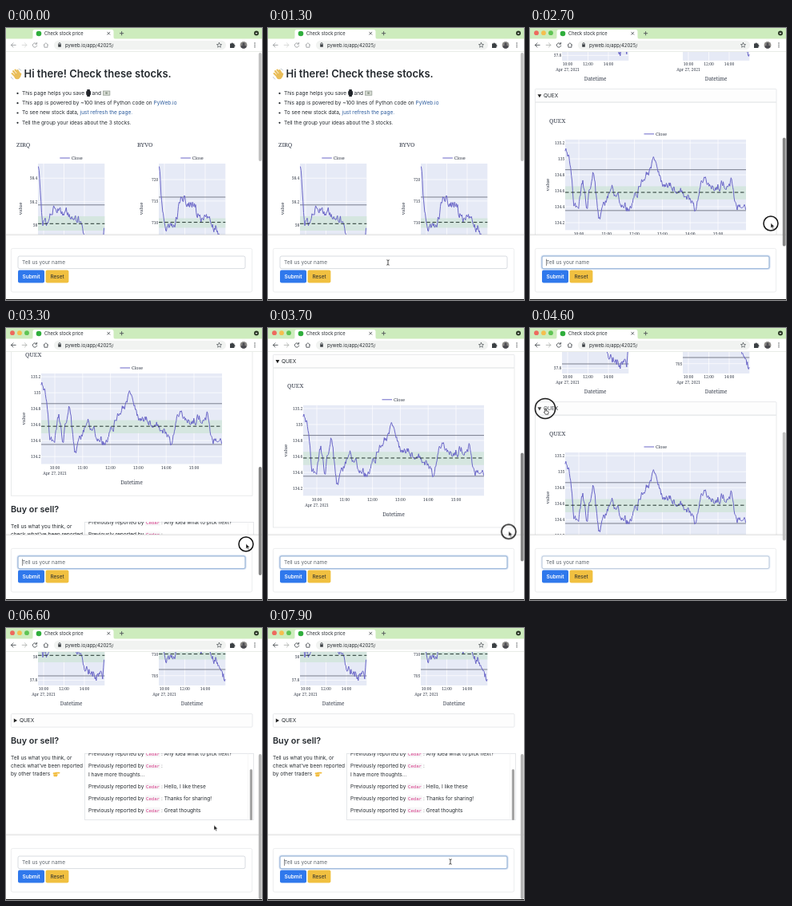
An HTML page that plays this animation: 320 by 341 pixels, repeating every 8000 ms.

```html
<!DOCTYPE html>
<html lang="en">
<head>
<meta charset="utf-8">
<title>Check stock price</title>
<style>
@property --scroll { syntax: "<number>"; inherits: true; initial-value: 0; }
@property --list { syntax: "<number>"; inherits: true; initial-value: 26; }
@property --open { syntax: "<number>"; inherits: true; initial-value: 1; }

html, body { margin: 0; width: 100%; height: 100%; overflow: hidden; background: #fff; }
#stage {
  display: block; width: 100vw; height: 100vh;
  animation: scroll 8s linear infinite, list 8s linear infinite, fold 8s step-end infinite;
}
text { font-family: Inter, "Open Sans", sans-serif; fill: #24292e; white-space: pre; }
.serif { font-family: "Noto Serif", "Liberation Serif", serif; fill: #333a48; }
.code { font-family: "Liberation Mono", "DejaVu Sans Mono", monospace; fill: #d63384; font-size: 5.7px; }
.link { fill: #2a5a9c; }
.line { fill: none; stroke-linecap: round; stroke-linejoin: round; }

#page { transform: translateY(calc(var(--scroll) * -1px)); }
#below { transform: translateY(calc(var(--open) * 200px)); }
#messages { transform: translateY(calc(var(--list) * -1px)); }
#listThumb { transform: translateY(calc(var(--list) * .77px)); animation: listGrab 8s step-end infinite; }
#thumb { transform: translateY(calc(var(--scroll) * .44px)); animation: grab 8s step-end infinite; }
.opened { opacity: var(--open); }
.closed { opacity: calc(1 - var(--open)); }

#lights { animation: wake 8s step-end infinite; }
#nav { animation: wakeNav 8s step-end infinite; }
#glow { animation: glow 8s linear infinite; }
#focus { animation: focus 8s step-end infinite; }
#caret { animation: blink calc(8s / 13) step-end infinite; }
#mouse { animation: mouse 8s linear infinite; }
#ring { animation: press 8s step-end infinite, shrink 8s linear infinite; }
#arrow { animation: arrow 8s step-end infinite; }
#hand { animation: hand 8s step-end infinite; }
#beam { animation: beam 8s step-end infinite; }

@keyframes scroll {
  0%, 23.5% { --scroll: 0; }
  26.25% { --scroll: 23.5; }
  33.75% { --scroll: 242; }
  41.25%, 43.75% { --scroll: 325; }
  50%, 58.2% { --scroll: 226; }
  58.21%, 100% { --scroll: 211; }
}
@keyframes list {
  0%, 67.5% { --list: 26; }
  71.25% { --list: 9; }
  73.75% { --list: 0; }
  78.1%, 100% { --list: 26; }
}
@keyframes fold { 0% { --open: 1; } 58.2%, 100% { --open: 0; } }
@keyframes grab { 0%, 50.3%, 100% { fill: #c2c2c2; } 23.5% { fill: #858585; } }
@keyframes listGrab { 0%, 79%, 100% { fill: #a5a5a5; } 66.8% { fill: #808080; } }
@keyframes wake { 0% { opacity: 0; } 16.8%, 100% { opacity: 1; } }
@keyframes wakeNav { 0% { opacity: .55; } 16.8%, 100% { opacity: 1; } }
@keyframes glow {
  0%, 16.8% { opacity: 0; }
  18.75%, 56.3% { opacity: 1; }
  58.5%, 90% { opacity: 0; }
  92%, 100% { opacity: 1; }
}
@keyframes focus { 0%, 56.3% { opacity: 0; } 16.8%, 90%, 100% { opacity: 1; } }
@keyframes blink { 0%, 86% { opacity: 0; } 34% { opacity: 1; } }
@keyframes mouse {
  0%, 4% { transform: translate(150px, 355px); animation-timing-function: ease-in-out; }
  13.75%, 18% { transform: translate(150px, 294px); animation-timing-function: ease-in-out; }
  23.5% { transform: translate(317px, 137px); }
  26.25% { transform: translate(317px, 144px); }
  33.75% { transform: translate(301px, 245px); }
  41.25%, 43.75% { transform: translate(300px, 271px); }
  50% { transform: translate(302px, 232px); animation-timing-function: ease-in-out; }
  56.25%, 61.25% { transform: translate(19px, 101px); animation-timing-function: ease-in-out; }
  66.25%, 67.5% { transform: translate(307px, 181px); }
  71.25% { transform: translate(307px, 168px); }
  73.75% { transform: translate(307px, 161px); }
  78.1%, 79.4% { transform: translate(307px, 181px); animation-timing-function: ease-in-out; }
  85%, 100% { transform: translate(228px, 293px); }
}
@keyframes press {
  0%, 18.7%, 50.2%, 58.7%, 78.7%, 91.8%, 100% { opacity: 0; }
  16.8%, 23.5%, 56.3%, 66.8%, 90% { opacity: 1; }
}
@keyframes shrink {
  0%, 56.2%, 58.75%, 100% { transform: scale(1); }
  56.25% { transform: scale(1.8); }
}
@keyframes arrow {
  0%, 18.6%, 62%, 100% { opacity: 1; }
  12.5%, 55.9%, 84% { opacity: 0; }
}
@keyframes hand { 0%, 62%, 100% { opacity: 0; } 55.9% { opacity: 1; } }
@keyframes beam { 0%, 18.6% { opacity: 0; } 12.5%, 84%, 100% { opacity: 1; } }
</style>
</head>
<body>
<svg id="stage" viewBox="0 0 320 341" preserveAspectRatio="none">
  <rect width="320" height="341" fill="#fff"/>

  <g id="page">
    <g class="line" stroke="#e9bd58" stroke-width="2.1">
      <path d="M9 54l4 5M11.5 52.5l4 5M14.5 53l2.6 4M7.6 57l4 4M18.3 57.5l-1.2 3.5"/>
      <circle cx="14" cy="60.5" r="2.6" fill="#e9bd58"/>
      <path d="M6.5 61.5q.6 2 2.4 2.6M16 51.2q2 .3 2.8 2" stroke="#9aa7b0" stroke-width=".6"/>
    </g>
    <g id="intro"></g>
    <g fill="#22262b">
      <rect x="101.3" y="77" width="3.6" height="9" rx=".6"/>
      <rect x="100.2" y="78.8" width="5.8" height="5.6" rx="1.4"/>
    </g>
    <rect x="121.3" y="79" width="8.6" height="5.2" fill="#d5dad2" stroke="#7d877d" stroke-width=".6"/>
    <circle cx="125.6" cy="81.6" r="1.4" fill="#8d988c"/>
    <g id="charts"></g>

    <g fill="none" stroke="#e3e5e7" stroke-width=".8">
      <rect x="6.4" y="318.6" width="301.6" height="16.6" rx="1" fill="#fdfdfd"/>
      <rect class="opened" x="6.4" y="335.2" width="301.6" height="200"/>
    </g>
    <path class="opened" d="M9.5 325.3h4.8l-2.4 4.2z" fill="#222"/>
    <path class="closed" d="M9.8 324.6v4.8l4.2-2.4z" fill="#222"/>
    <g id="summary"></g>
    <g id="details" class="opened"></g>

    <g id="below">
      <g id="opinion"></g>
      <path class="line" d="M59.5 393.2h3.5M62 392.6h4.6M60 395h4M60.4 396.4h2.8" stroke="#f2bd3f" stroke-width="1.7"/>
      <svg x="98" y="368" width="212" height="84">
        <rect x=".5" y=".5" width="211" height="83" fill="#fff" stroke="#dfe2e5" stroke-width=".8"/>
        <g id="messages"></g>
        <path d="M204.5 0v84" stroke="#f0f0f0" stroke-width=".6"/>
        <rect id="listThumb" x="206.8" width="3.2" height="64" rx="1.6"/>
      </svg>
    </g>
  </g>

  <g id="panel">
    <rect y="259" width="320" height="82" fill="#fff"/>
    <rect y="257.6" width="320" height="1.4" opacity=".04"/>
    <rect y="259" width="320" height=".8" fill="#dcdcdc"/>
    <rect x="6.4" y="276.4" width="301.2" height="54.6" rx="2" fill="#fff" stroke="#e8e9ea" stroke-width=".8"/>
    <rect x="15" y="286" width="284" height="15.6" rx="2" fill="#fff" stroke="#ced4da" stroke-width=".8"/>
    <g id="glow" fill="none">
      <rect x="14.4" y="285.4" width="285.2" height="16.8" rx="2.6" stroke="#3a70bd" stroke-opacity=".22" stroke-width="1.8"/>
      <rect x="15" y="286" width="284" height="15.6" rx="2" stroke="#97b6de" stroke-width=".8"/>
    </g>
    <rect x="15" y="303.6" width="33" height="16" rx="2" fill="#2f78ec"/>
    <rect x="49.6" y="303.6" width="28.8" height="16" rx="2" fill="#f1c040"/>
    <g id="form"></g>
    <g id="focus"><rect id="caret" x="20" y="289.6" width=".6" height="8.4" fill="#444"/></g>
  </g>

  <rect id="thumb" class="opened" x="315.8" y="31" width="3.8" height="136" rx="1.9"/>
  <rect class="closed" x="315.8" y="158" width="3.8" height="182" rx="1.9" fill="#b5b5b5"/>

  <g id="chrome">
    <rect width="320" height="14" fill="#cdecbd"/>
    <path d="M31 14q2.5 0 2.5-3V4.5q0-2.5 2.5-2.5H132q2.5 0 2.5 2.5V11q0 3 2.5 3z" fill="#fff"/>
    <rect y="13.5" width="320" height="16.5" fill="#fff"/>
    <rect y="29.4" width="320" height=".6" fill="#dadfd8"/>
    <g id="lights">
      <circle cx="8" cy="6.2" r="2.9" fill="#ed6a5e"/>
      <circle cx="17" cy="6.2" r="2.9" fill="#f4be4f"/>
      <circle cx="26" cy="6.2" r="2.9" fill="#5fc454"/>
    </g>
    <circle cx="41" cy="7" r="3.3" fill="#2fae3c"/>
    <circle cx="313" cy="6.6" r="3" fill="#2d3a28"/>
    <path d="M311.6 6h2.8l-1.4 1.8z" fill="#fff"/>
    <rect x="60" y="15.8" width="215" height="11.4" rx="5.7" fill="#f1f3f1"/>
    <g class="line" stroke="#50555a" stroke-width=".9">
      <path d="M126.8 5.2l3 3m0-3l-3 3M142.4 6.7h4.4m-2.2-2.2v4.4"/>
      <g id="nav">
        <path d="M12.2 21.4H6.4m2.6-2.6l-2.6 2.6 2.6 2.6"/>
        <path d="M20.2 21.4H26m-2.6-2.6l2.6 2.6-2.6 2.6" stroke="#b1b5b1"/>
        <path d="M38 19.6a2.7 2.7 0 1 0 .7 2.6M38.6 18.3v1.9h-1.9"/>
        <path d="M47 21.4l2.9-2.7 2.9 2.7M47.900 21v3.200h4V21"/>
      </g>
      <path d="M65.800 20.800v-1a1.200 1.200 0 0 1 2.400 0v1"/>
      <path d="M266.500 18.400l.9 2 2.200.2-1.700 1.500.5 2.100-1.900-1.100-1.900 1.100.5-2.100-1.700-1.500 2.200-.2z" stroke-width=".7"/>
    </g>
    <g fill="#3c4044">
      <rect x="65.200" y="20.600" width="3.600" height="3.200" rx=".4"/>
      <path d="M280 19.600h1.600a1.100 1.100 0 0 1 2.200 0h1.600v1.600a1.100 1.100 0 0 1 0 2.200v1.600H280z"/>
      <circle cx="311" cy="19" r=".7"/><circle cx="311" cy="21.400" r=".7"/><circle cx="311" cy="23.800" r=".7"/>
    </g>
    <circle cx="297" cy="21.400" r="4.400" fill="#8b8986"/>
    <path d="M293.500 24a3.600 3.600 0 0 1 7 0 4.400 4.400 0 0 1-7 0z" fill="#4a4a50"/>
    <circle cx="297" cy="20" r="1.600" fill="#4a4a50"/>
    <g id="titles"></g>
    <rect y="340" width="320" height="1" fill="#111"/>
  </g>

  <g id="mouse">
    <circle id="ring" r="9" fill="#fff" fill-opacity=".15" stroke="#111" stroke-width="1.500" vector-effect="non-scaling-stroke"/>
    <path id="arrow" d="M0-.5v6.300l1.500-1.300 1 2.200 1.100-.5-1-2.100h2z" fill="#111" stroke="#fff" stroke-width=".5"/>
    <path id="hand" d="M-.2 0q.8-.8 1.300.2v2.600l2.500.6q.8.300.6 1.200l-.6 2.600H.4L-1.600 4.600q0-1 1.400-.4z" fill="#fff" stroke="#111" stroke-width=".7"/>
    <path id="beam" class="line" d="M-1.300-3.200q1.300 0 1.300.8v4.800q0 .8 1.300.8M1.300-3.200q-1.300 0-1.300.8m0 4.800q0 .8-1.300.8" stroke="#222" stroke-width=".8"/>
  </g>
</svg>

<script>
const add = (id, markup) => document.getElementById(id).insertAdjacentHTML("beforeend", markup);

// y is the middle of the capitals
const text = (x, y, str, size = 6.5, attrs = "") =>
  `<text x="${x}" y="${y + size * 0.36}" font-size="${size}" ${attrs}>${str}</text>`;
const serif = (x, y, str, size, anchor = "start") =>
  text(x, y, str, size, `class="serif" text-anchor="${anchor}"`);
const rule = (x1, y1, x2, y2, attrs) =>
  `<path d="M${x1} ${y1}L${x2} ${y2}" fill="none" ${attrs}/>`;

function random(seed) {
  return () => (seed = (seed * 16807) % 2147483647) / 2147483647;
}

// A mean-reverting random walk around the trend through the key points
function priceLine(trend, { seed, jitter, bottom }) {
  const rnd = random(seed);
  let d = "M" + trend[0], walk = 0;
  for (let i = 1; i < trend.length; i++) {
    const [x0, y0] = trend[i - 1], [x1, y1] = trend[i];
    for (let x = x0 + 0.75; x <= x1; x += 0.75) {
      walk = walk * 0.6 + (rnd() - 0.5) * jitter;
      const y = y0 + (y1 - y0) * (x - x0) / (x1 - x0) + walk;
      d += `L${x.toFixed(1)} ${Math.min(y, bottom - 1).toFixed(1)}`;
    }
  }
  return d;
}

function chart(c) {
  const { x, top, right, bottom } = c;
  const hourX = i => c.hour0 + i * c.hourStep;
  const tickY = i => c.tick0 + i * c.tickStep;
  const white = 'stroke="#fff" stroke-width=".7"';
  const thin = 'stroke="#4b5060" stroke-width=".7"';
  const ink = 'stroke="#6a66c8" stroke-width="1"';
  return serif(c.titleX, c.titleY, c.title, 7.4) +
    rule(c.legend, top - 7, c.legend + 12.5, top - 7, ink) +
    serif(c.legend + 14.5, top - 7, "Close", 5.6) +
    `<rect x="${x}" y="${top}" width="${right - x}" height="${bottom - top}" fill="#e6eaf6"/>` +
    c.hours.map((h, i) => rule(hourX(i), top, hourX(i), bottom, white) +
      serif(hourX(i), bottom + 4.5, h + ":00", 5, "middle")).join("") +
    c.ticks.map((t, i) => rule(x, tickY(i), right, tickY(i), white) +
      serif(x - 0.6, tickY(i), t, 5, "end")).join("") +
    `<rect x="${x}" y="${c.band[0]}" width="${right - x}" height="${c.band[1] - c.band[0]}" fill="#cfe4d8" opacity=".75"/>` +
    c.limits.map(y => rule(x, y, right, y, thin)).join("") +
    `<path class="line" d="${priceLine(c.trend, c)}" ${ink}/>` +
    rule(x, c.mean, right, c.mean, 'stroke="#23352f" stroke-width="1" stroke-dasharray="4.5 2.8"') +
    serif(c.hour0, bottom + 11.5, "Apr 27, 2021", 5, "middle") +
    serif((x + right) / 2, bottom + 23, "Datetime", 6.4, "middle") +
    `<g transform="translate(${x - 22.5} ${(top + bottom) / 2}) rotate(-90)">${serif(0, 0, "value", 6, "middle")}</g>`;
}

const small = x => ({
  x, right: x + 83.3, top: 170, bottom: 283, titleX: x - 27, titleY: 146, legend: x + 27.3,
  hours: [10, 12, 14], hour0: x + 7, hourStep: 25.5, jitter: 11
});

add("charts", chart({
  ...small(40), title: "ZIRQ", seed: 71,
  ticks: ["58.4", "58.2", "58", "57.8"], tick0: 188.3, tickStep: 29.4,
  band: [236, 254], limits: [221.8, 271], mean: 245.3,
  trend: [[40.5, 174], [43, 208], [46, 248], [52, 240], [58, 228], [80, 231], [92, 244], [100, 260], [114, 271], [121, 271], [123, 235]]
}) + chart({
  ...small(191), title: "BYVO", seed: 33,
  ticks: ["720", "715", "710", "705"], tick0: 190, tickStep: 26.9,
  band: [238.5, 250.5], limits: [212, 263], mean: 243.6,
  trend: [[191.5, 174], [195, 226], [199, 252], [208, 249], [214, 238], [220, 207], [225, 219], [234, 220], [240, 235], [256, 244], [268, 255], [274, 279]]
}));

add("details", chart({
  x: 44, right: 270, top: 382, bottom: 495.5, title: "QUEX", titleX: 24, titleY: 358, legend: 142.5,
  hours: [10, 11, 12, 13, 14, 15], hour0: 61, hourStep: 34.8, jitter: 9, seed: 19,
  ticks: ["135.2", "135", "134.8", "134.6", "134.4", "134.2"], tick0: 386.2, tickStep: 20,
  band: [440.5, 457], limits: [419.8, 471], mean: 448.2,
  trend: [[44, 396], [51, 412], [55, 464], [60, 472], [66, 435], [71, 465], [79, 419], [86, 486], [92, 467],
    [103, 444], [123, 470], [140, 436], [157, 405], [165, 438], [190, 447], [206, 468], [217, 427],
    [228, 442], [252, 434], [256, 468], [270, 464]]
}));

const bullets = [
  "This page helps you save",
  'This app is powered by ~100 lines of Python code on <tspan class="link">PyWeb.io</tspan>',
  'To see new stock data, <tspan class="link">just refresh the page.</tspan>',
  "Tell the group your ideas about the 3 stocks."
];
add("intro", text(22.5, 57.8, "Hi there! Check these stocks.", 13, 'font-weight="600"') +
  bullets.map((b, i) => {
    const y = 81.5 + i * 12.3;
    return `<circle cx="14.5" cy="${y + 0.4}" r="1.1" fill="#24292e"/>` + text(20, y, b);
  }).join("") + text(107.5, 81.5, "and"));

add("summary", text(17, 327, "QUEX"));

add("opinion", text(6, 352.3, "Buy or sell?", 10.8, 'font-weight="600"') +
  ["Tell us what you think, or", "check what've been reported", "by other traders"]
    .map((line, i) => text(6, 373.2 + i * 10.3, line)).join(""));

// A leading line break puts the words on a line of their own
const messages = ["Nice pick!", "Any idea what to pick next?", "\nI have more thoughts...",
  "Hello, I like these", "Thanks for sharing!", "Great thoughts"];
let y = 12;
for (const said of messages) {
  const [first, second] = said.split("\n");
  add("messages", `<rect x="76" y="${y - 3.6}" width="19" height="7.6" rx="1" fill="#f7f7f8"/>` +
    text(5, y, `Previously reported by<tspan class="code" x="77">Cedar</tspan><tspan x="96">: ${first}</tspan>`));
  if (second) add("messages", text(5, y += 10.3, second));
  y += 15;
}

add("form", text(20, 294, "Tell us your name", 6.5, 'style="fill:#5f666d"') +
  text(31.5, 311.7, "Submit", 6.5, 'text-anchor="middle" font-weight="600" style="fill:#fff"') +
  text(64, 311.7, "Reset", 6.5, 'text-anchor="middle"'));

add("titles", text(48, 6.7, "Check stock price", 5.7) + text(74, 21.4, "pyweb.io/app/42025/", 5.9));
</script>
</body>
</html>
```
